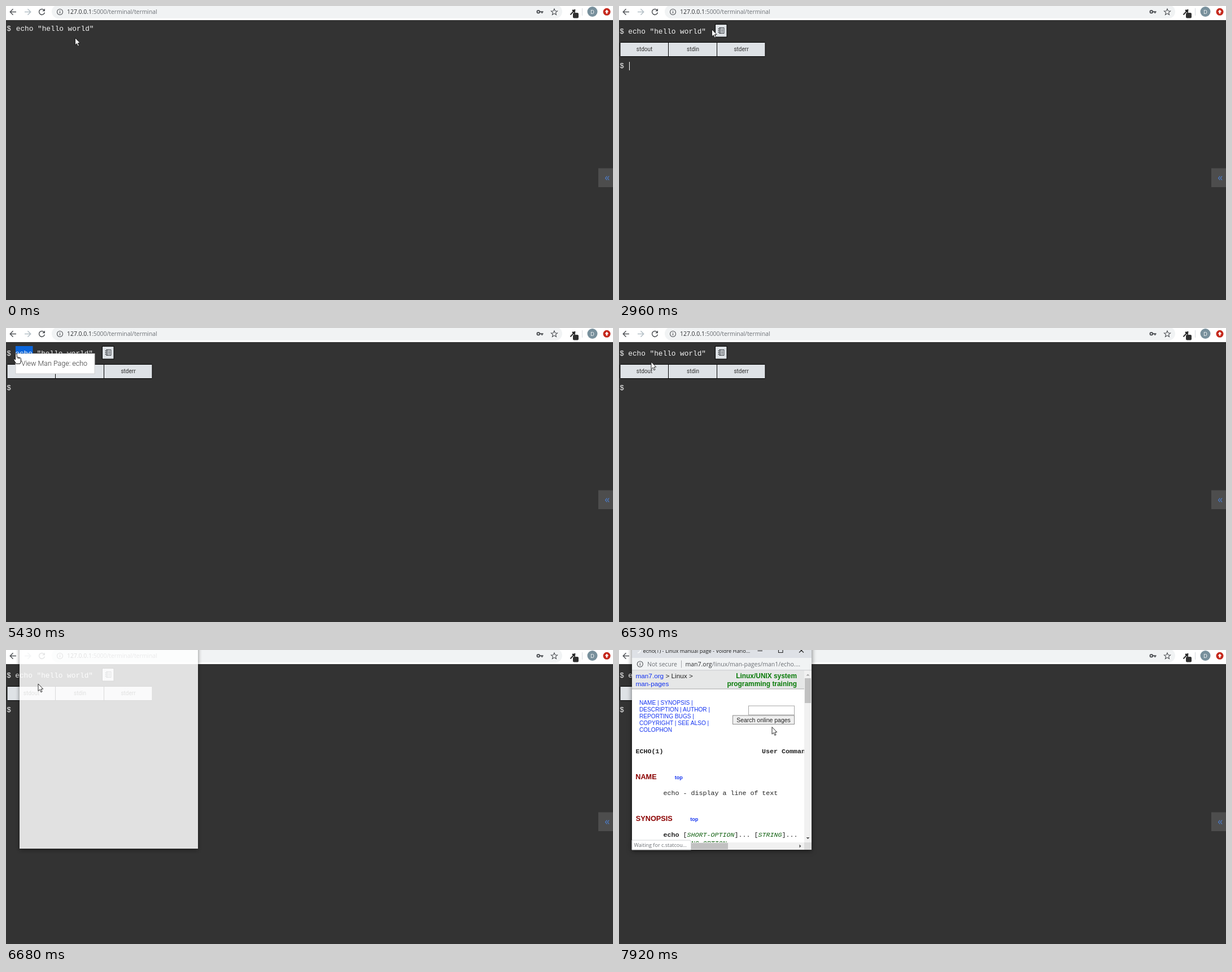
An HTML page for the animation above (8 s loop, 1075 by 521 pixels).

```html
<!DOCTYPE html>
<html lang="en">
<head>
<meta charset="utf-8">
<title>Terminal man page lookup</title>
<style>
  html, body { margin: 0; width: 100%; height: 100%; overflow: hidden; background: #333; }
  svg { display: block; width: 1075px; height: 521px; }
  text { white-space: pre; }
  .ui { font-family: "Open Sans", "Noto Sans", sans-serif; font-size: 10.5px; fill: #6b6f74; }
  .dark { fill: #2a2c2f; }
  .term { font: 12.75px "Liberation Mono", monospace; fill: #f4f4f4; }
  .label { font: 10px Roboto, sans-serif; fill: #333; text-anchor: middle; }
  .page { font-family: "Liberation Sans", sans-serif; font-size: 11.75px; fill: #222; }
  .mono { font: 11.67px "Liberation Mono", monospace; fill: #222; }
  .link { fill: #1433f0; }
  .nav { font-size: 10.15px; }
  .bold { font-weight: bold; }
  .head { font-weight: bold; font-size: 12.7px; fill: #8b0000; }
  .top { font-weight: bold; font-size: 9px; fill: #1433f0; }
  .arg { font-style: italic; fill: #106010; }
  .line { fill: none; stroke: #505357; stroke-width: 1.5; }
  .box { fill: #dee2e6; stroke: #000; }
  .caret { fill: #fff; }
  #window { filter: drop-shadow(0 2px 4px rgba(0, 0, 0, .55)); transform-origin: 182px 37px; }
</style>
</head>
<body>
<svg viewBox="0 0 1075 521">
  <defs>
    <g id="info">
      <circle r="5" class="line" style="stroke-width:1.1"/>
      <path d="M0-.8V2.8M0-2.8V-1.6" class="line" style="stroke-width:1.2"/>
    </g>
    <clipPath id="pageClip"><rect x="23" y="36" width="305" height="305"/></clipPath>
  </defs>
  <rect width="1075" height="521" fill="#333"/>

  <!-- browser toolbar -->
  <rect width="1075" height="25" fill="#fff"/>
  <rect x="81" y="-2" width="904" height="24" rx="12" fill="#f1f3f4"/>
  <path d="M18 10.5H7.5M12.5 5.3L7.3 10.5L12.5 15.7" class="line"/>
  <path d="M33 10.5H43.5M38.5 5.3L43.7 10.5L38.5 15.7" class="line" style="stroke:#b4bfc6"/>
  <path d="M67.2 7A5 5 0 1 0 68.4 11.5" class="line"/>
  <path d="M69 4.5V9.3H64.2Z" fill="#505357"/>
  <use href="#info" x="95.5" y="10.5"/>
  <text x="108" y="14.3" class="ui" style="font-size:10.4px"><tspan class="dark">127.0.0.1</tspan>:5000/terminal/terminal</text>
  <circle cx="942.8" cy="10.2" r="2.3" fill="none" stroke="#505357" stroke-width="2"/>
  <path d="M945.5 10.2H951.5M949.3 10.2V13" class="line" style="stroke-width:2"/>
  <path d="M971 5L972.6 8.7L976.6 9L973.5 11.6L974.5 15.5L971 13.4L967.5 15.5L968.5 11.6L965.4 9L969.4 8.7Z" class="line" style="stroke-width:1.1"/>
  <path d="M999.5 15.5L1005 9.5" class="line" style="stroke:#333;stroke-width:2"/>
  <path d="M1003.2 7L1007.8 11.3M1005.5 9L1008 6.4" class="line" style="stroke:#222;stroke-width:2.6"/>
  <rect x="1004" y="12" width="10" height="9.5" rx="2" fill="#303030"/>
  <rect x="1020" y="4" width="1" height="13" fill="#d5d8dc"/>
  <circle cx="1038.5" cy="10" r="9" fill="#78909c"/>
  <text x="1038.5" y="13.5" class="ui" text-anchor="middle" style="font-size:9.5px;fill:#fff">D</text>
  <circle cx="1064" cy="10.3" r="6.5" fill="#c5281c"/>
  <path d="M1064 6.6L1067.4 10.4H1065.3V13.6H1062.7V10.4H1060.6Z" fill="#fff"/>

  <!-- side tab -->
  <rect x="1049" y="287.5" width="26" height="33.5" fill="#4d4d4d"/>
  <path d="M1064.4 301.5L1061.6 305L1064.4 308.5M1068 301.5L1065.2 305L1068 308.5" fill="none" stroke="#4b83dc" stroke-width="1.2"/>

  <g id="typed" class="term">
    <text x="1.3" y="44">$</text>
    <text x="17.8" y="44">echo "hello world"</text>
    <rect id="lineCaret" class="caret" x="156" y="33" width="1" height="15"/>
  </g>

  <g id="result">
    <rect id="selection" y="32" height="24" fill="#0b66dc"/>
    <g class="term">
      <text x="1.3" y="48.7">$</text>
      <text x="16.3" y="48.7">echo "hello world"</text>
      <text x="1.3" y="109.7">$</text>
    </g>
    <rect id="promptCaret" class="caret" x="18" y="99" width="1" height="15"/>
    <rect x="170.5" y="32.5" width="20.5" height="22.5" class="box"/>
    <path d="M177.5 38.5H186V48.5H177.5ZM179.5 38.5V48.5M175.5 40.5H178M175.5 43.5H178M175.5 46.5H178M181 41H184.5M181 43.5H184.5M181 46H184.5" class="line" style="stroke-width:1;stroke:#3c4045"/>
    <rect x="2" y="64.5" width="257" height="25" rx="1" class="box"/>
    <path d="M87.5 64V90M173.5 64V90" stroke="#000"/>
    <g class="label">
      <text x="45" y="80.3">stdout</text>
      <text x="131" y="80.3">stdin</text>
      <text x="216.5" y="80.3">stderr</text>
    </g>
  </g>

  <g id="popup">
    <rect x="17" y="45.5" width="140" height="35.5" fill="#fff" stroke="#d0d0d0"/>
    <text id="popupText" x="27" y="67.4" style="font:300 12.5px Roboto,sans-serif">View Man Page: echo</text>
  </g>

  <g id="window">
    <rect x="23" y="-20" width="318" height="374" fill="#fff"/>
    <g id="frame">
      <rect x="23" y="-20" width="318" height="34" fill="#dee1e6"/>
      <path id="spinner" d="M33-5A5 5 0 0 1 38 0" fill="none" stroke="#fff" stroke-width="1.5"/>
      <text id="title" x="42.5" y="5" class="ui" style="font-size:9.25px;fill:#1a1a1a"></text>
      <path d="M245.5 1.5H254M282.5-3V4.5H290V-3ZM319-3L327 4.5M327-3L319 4.5" class="line" style="stroke:#222;stroke-width:1.1"/>
      <rect x="23" y="14" width="318" height="22" fill="#f1f3f4"/>
      <rect x="23" y="35.5" width="318" height="1" fill="#b4b6b9"/>
      <use href="#info" x="37.3" y="25"/>
      <text id="openUrl" x="50" y="28.7" class="ui"><tspan class="dark">man7.org</tspan>/linux/man-pages/man1/echo.1.html</text>
    </g>

    <g id="loaded">
      <g class="ui">
        <text x="50" y="28.7">Not secure</text>
        <rect x="110" y="18.5" width="1" height="13" fill="#a5a8ac"/>
        <text x="117.5" y="28.7"><tspan class="dark">man7.org</tspan>/linux/man-pages/man1/echo....</text>
      </g>
      <g clip-path="url(#pageClip)" class="page">
        <rect x="23" y="36.5" width="305" height="32.5" fill="#e6e7e7"/>
        <rect x="23" y="68.5" width="305" height="1" fill="#a8a8a8"/>
        <text x="29.5" y="50"><tspan class="link">man7.org</tspan> &gt; Linux &gt;</text>
        <text x="29.5" y="64" class="link">man-pages</text>
        <g class="bold" text-anchor="end" style="fill:#077a07;font-size:11.9px">
          <text x="315" y="50">Linux/UNIX system</text>
          <text x="315" y="64">programming training</text>
        </g>
        <g class="link nav">
          <text x="36" y="97">NAME | SYNOPSIS |</text>
          <text x="36" y="109">DESCRIPTION | AUTHOR |</text>
          <text x="36" y="121">REPORTING BUGS |</text>
          <text x="36" y="133">COPYRIGHT | SEE ALSO |</text>
          <text x="36" y="145">COLOPHON</text>
        </g>
        <rect x="229.5" y="99" width="81" height="16" fill="#fff" stroke="#a5a5a5"/>
        <rect x="201.5" y="116" width="109" height="15.5" fill="#efefef" stroke="#8c8c8c"/>
        <text x="256" y="127.5" text-anchor="middle" style="font-size:10.5px">Search online pages</text>
        <text x="29.5" y="183" class="mono bold">ECHO(1)</text>
        <text x="253" y="183" class="mono bold">User Commands</text>
        <text x="29.3" y="229" class="head">NAME</text>
        <text x="98.7" y="229" class="top">top</text>
        <text x="78.5" y="257" class="mono">echo - display a line of text</text>
        <text x="29.8" y="303" class="head">SYNOPSIS</text>
        <text x="126.2" y="303" class="top">top</text>
        <text x="78.5" y="331" class="mono"><tspan class="bold">echo</tspan> [<tspan class="arg">SHORT-OPTION</tspan>]... [<tspan class="arg">STRING</tspan>]...</text>
        <text x="78.5" y="346" class="mono"><tspan class="bold">echo</tspan> <tspan class="arg">LONG-OPTION</tspan></text>
      </g>
      <path d="M328 36.5H341V354H23V341H328Z" fill="#f1f1f1"/>
      <rect x="328" y="341" width="13" height="13" fill="#dcdcdc"/>
      <rect x="329" y="50" width="11" height="44" fill="#c1c1c1"/>
      <rect x="36" y="342" width="157" height="11" fill="#c1c1c1"/>
      <path d="M331.5 45.5L334.5 42.5L337.5 45.5Z" fill="#a3a3a3"/>
      <path d="M331.5 332L334.5 335L337.5 332ZM319.5 344.5L322.5 347.5L319.5 350.5Z" fill="#505050"/>
    </g>

    <g id="status">
      <path d="M23 337H125Q127.5 337 127.5 340V354H23Z" fill="#fff" stroke="#d2d4d6"/>
      <text id="statusText" x="26.5" y="349" class="ui" style="font-size:9.05px"></text>
    </g>
  </g>

  <g id="pointer" fill="#fff" stroke="#111" stroke-linejoin="round">
    <path id="arrow" d="M.5.5V13.2L3.3 10.5L5.4 15.2L7.5 14.3L5.4 9.8L9.2 9.6Z" stroke-width=".9"/>
    <path id="hand" d="M3.5 10V1.9a1.4 1.4 0 0 1 2.8 0V6.5l5.6 1.2q1.7.5 1.5 2.2V14l-1.5 4.4H5.2L1 12q-.9-1.7.5-2 1-.2 2 1.4zM8.3 7V9.6M10.6 7.5V9.8" stroke-width="1"/>
  </g>
</svg>
<script>
const LOOP = 8000, CHAR = 7.65, WORD_LEFT = 16.5, WORD_RIGHT = 47.5;
const $ = id => document.getElementById(id);
const START = [122, 56];

// Pointer moves: first step, last step, number of steps, end x, end y
const MOVES = [
  [70, 540, 7, 162, 36],
  [840, 1010, 3, 164, 36],
  [1940, 1940, 1, 164, 41],
  [3270, 3870, 9, 46, 41],
  [4050, 4180, 2, 48, 37],
  [4330, 4790, 7, 7, 36],
  [4960, 4960, 1, 17, 40],
  [5280, 5280, 1, 7, 36],
  [5430, 5430, 1, 13, 45],
  [5830, 6050, 4, 54, 61],
  [6450, 6450, 1, 56.5, 59.5],
  [6760, 7070, 5, 198.5, 106.5],
  [7290, 7920, 9, 270.5, 136]
];

function pointerAt(t) {
  let [x, y] = START;
  for (const [from, to, steps, endX, endY] of MOVES) {
    if (t < from) break;
    const done = t >= to ? 1 : (1 + Math.floor((t - from) / (to - from) * (steps - 1))) / steps;
    x += (endX - x) * done;
    y += (endY - y) * done;
  }
  return [x, y];
}

const within = (t, ...spans) => spans.some(([a, b]) => t >= a && t < b);
const show = (id, on) => { $(id).style.display = on ? "" : "none"; };

function draw(t) {
  const [x, y] = pointerAt(t);
  const popup = within(t, [5430, 6450]), loaded = t >= 7600;

  show("typed", t < 1790);
  show("lineCaret", within(t, [840, 1390]));
  show("result", t >= 1790);
  show("promptCaret", within(t, [1940, 2490], [2960, 3490], [4050, 4180]));

  // The word is selected from its right end towards the pointer.
  const chars = t >= 4790 ? 4 : Math.max(0, Math.min(4, Math.round((WORD_RIGHT - x) / CHAR)));
  const left = Math.max(WORD_LEFT, WORD_RIGHT - chars * CHAR);
  show("selection", within(t, [4330, 6300]));
  $("selection").setAttribute("x", left);
  $("selection").setAttribute("width", WORD_RIGHT - left);

  show("popup", popup);
  $("popupText").setAttribute("fill", t >= 5830 ? "#16181b" : "#333");

  const [opacity, scale] = t < 6680 ? [.4, .975] : t < 6760 ? [.853, .9937] : [1, 1];
  show("window", t >= 6600);
  $("window").style.opacity = opacity;
  $("window").style.transform = `scale(${scale})`;
  show("frame", t >= 6830);
  show("openUrl", !loaded);
  show("loaded", loaded);
  show("status", t >= 6990);
  $("title").textContent = loaded ? "echo(1) - Linux manual page - Voldre Hano..." : "Untitled - Voldre Hanome";
  $("statusText").textContent = loaded ? "Waiting for c.statcou..." : t < 7290 ? "Resolving host..." : "Waiting for man7.org...";
  $("spinner").setAttribute("transform", `rotate(${90 + (t - 7920) * .36} 33 0)`);

  show("arrow", !popup);
  show("hand", popup);
  $("pointer").setAttribute("transform", `translate(${x} ${y})`);
}

const begin = performance.now();
function tick() {
  draw((performance.now() - begin) % LOOP);
  requestAnimationFrame(tick);
}
tick();
</script>
</body>
</html>
```
